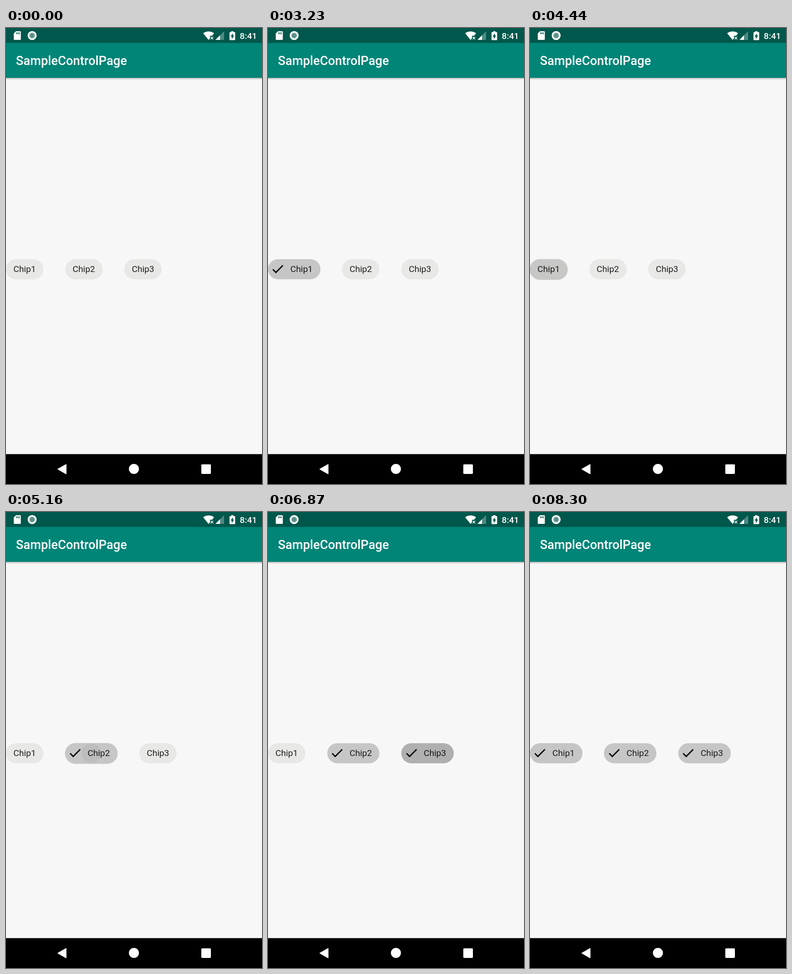
An HTML page that plays this animation: 561 px wide and 998 px high, repeating every 8510 ms.

```html
<!DOCTYPE html>
<html lang="en">
<head>
<meta charset="utf-8">
<title>Chips</title>
<style>
  html, body { margin: 0; width: 100%; height: 100%; overflow: hidden; background: #f7f7f7; }
  svg { display: block; }
  #screen { position: absolute; left: 0; top: 0; font-family: Roboto, sans-serif; font-weight: 500; }
  #chips { position: absolute; left: 0; top: 506px; display: flex; gap: 47.73px; }
  .chip {
    position: relative; box-sizing: border-box; width: 82px; height: 43.6px; padding-left: 16.36px;
    border-radius: 21.8px; background-color: #e8e8e7; color: rgba(0, 0, 0, .87);
    font: 19.09px/43.6px Roboto, sans-serif; white-space: nowrap;
  }
  .chip svg { position: absolute; left: 5.45px; top: 5.45px; display: none; }
  .checked { width: 114.73px; padding-left: 49.09px; background-color: #c6c6c6; }
  .checked svg { display: block; }
</style>
</head>
<body>
<svg id="screen" width="561" height="998" viewBox="0 0 561 998" fill="#fff">
  <defs>
    <linearGradient id="shade" x2="0" y2="1">
      <stop stop-opacity=".34"/>
      <stop offset=".4" stop-opacity=".12"/>
      <stop offset="1" stop-opacity="0"/>
    </linearGradient>
  </defs>
  <rect y="109" width="561" height="5" fill="url(#shade)"/>
  <rect width="561" height="109" fill="#008577"/>
  <rect width="561" height="32.7" fill="#00574b"/>
  <rect y="932.6" width="561" height="65.4" fill="#000"/>
  <text x="21.8" y="81.4" font-size="27.27">SampleControlPage</text>

  <!-- Status bar: storage, sync, wifi, signal, battery, clock -->
  <path d="M22 7H31Q32.5 7 32.5 8.5V24.500Q32.500 26 31 26H18.500Q17 26 17 24.500V12Z"/>
  <path d="M23.300 9.500v4M26.300 9.500v4M29.300 9.500v4" stroke="#00574b" stroke-width="1.700"/>
  <circle cx="57.300" cy="16.500" r="9.800"/>
  <circle cx="57.300" cy="16.500" r="6.700" fill="#9dbcb7"/>
  <circle cx="57.300" cy="16.500" r="4.800" fill="#5a8f87"/>
  <path d="M432 11.500C439 6 449 6 456 11.500L451.500 17H447V22.500L444 26.300Z"/>
  <path d="M448.500 19.300l5.500 5.500m0-5.500l-5.500 5.500" stroke="#fff" stroke-width="1.600"/>
  <path d="M478 7V26H459Z" opacity=".3"/>
  <path d="M469 16V26H459Z"/>
  <path d="M493.500 7h5v2h2.500q1.200 0 1.200 1.200v15q0 1.300-1.200 1.300h-10q-1.200 0-1.200-1.300v-15q0-1.200 1.200-1.200h2.500Z"/>
  <path d="M497.300 11.500V16.500H500L494.800 24.500V18.800H492.100Z" fill="#00574b"/>
  <text x="512.300" y="23.600" font-size="19.090">8:41</text>

  <!-- Navigation bar -->
  <path d="M114 965.500L131.500 955.500V975.500Z" stroke="#fff" stroke-width="2" stroke-linejoin="round"/>
  <circle cx="280.300" cy="965" r="11"/>
  <rect x="428" y="955" width="21" height="21" rx="2"/>
</svg>
<div id="chips"></div>
<script>
const LOOP = 8510, RIPPLE = 670;
// lead: how far the press feedback has run when the chip toggles
const taps = [
  { chip: 0, at: 3230, lead: 0 },
  { chip: 0, at: 4300, lead: 0 },
  { chip: 1, at: 5160, lead: 45 },
  { chip: 2, at: 6470, lead: 0 },
  { chip: 0, at: 7640, lead: 0 }
];
const check = '<svg width="32.73" height="32.73" viewBox="0 0 24 24">' +
  '<path d="M9 16.17L4.830 12 3.410 13.410 9 19 21 7 19.590 5.590z"/></svg>';

const clamp = v => Math.min(1, Math.max(0, v));
const chips = [1, 2, 3].map(n => {
  const el = document.createElement('div');
  el.className = 'chip';
  el.innerHTML = check + 'Chip' + n;
  document.getElementById('chips').append(el);
  return el;
});

function draw(now) {
  const t = now % LOOP;
  chips.forEach((el, i) => {
    const past = taps.filter(tap => tap.chip === i && t >= tap.at);
    const last = past[past.length - 1];
    const age = last ? t - last.at + last.lead : RIPPLE;
    const alpha = 0.15 * clamp(age / 150) * clamp((RIPPLE - age) / 360);
    const radius = 62 * (1 - (1 - clamp(age / 250)) ** 2);
    const lift = clamp(age / 50) * clamp((230 - age) / 100);
    const ink = `rgba(0,0,0,${alpha})`;
    el.classList.toggle('checked', past.length % 2 === 1);
    el.style.backgroundImage = alpha > 0
      ? `radial-gradient(circle, ${ink} ${radius}px, transparent ${radius + 1}px)` : 'none';
    el.style.boxShadow = lift > 0 ? `0 .5px 2px rgba(0,0,0,${0.4 * lift})` : 'none';
  });
  requestAnimationFrame(draw);
}
draw(0);
</script>
</body>
</html>
```
